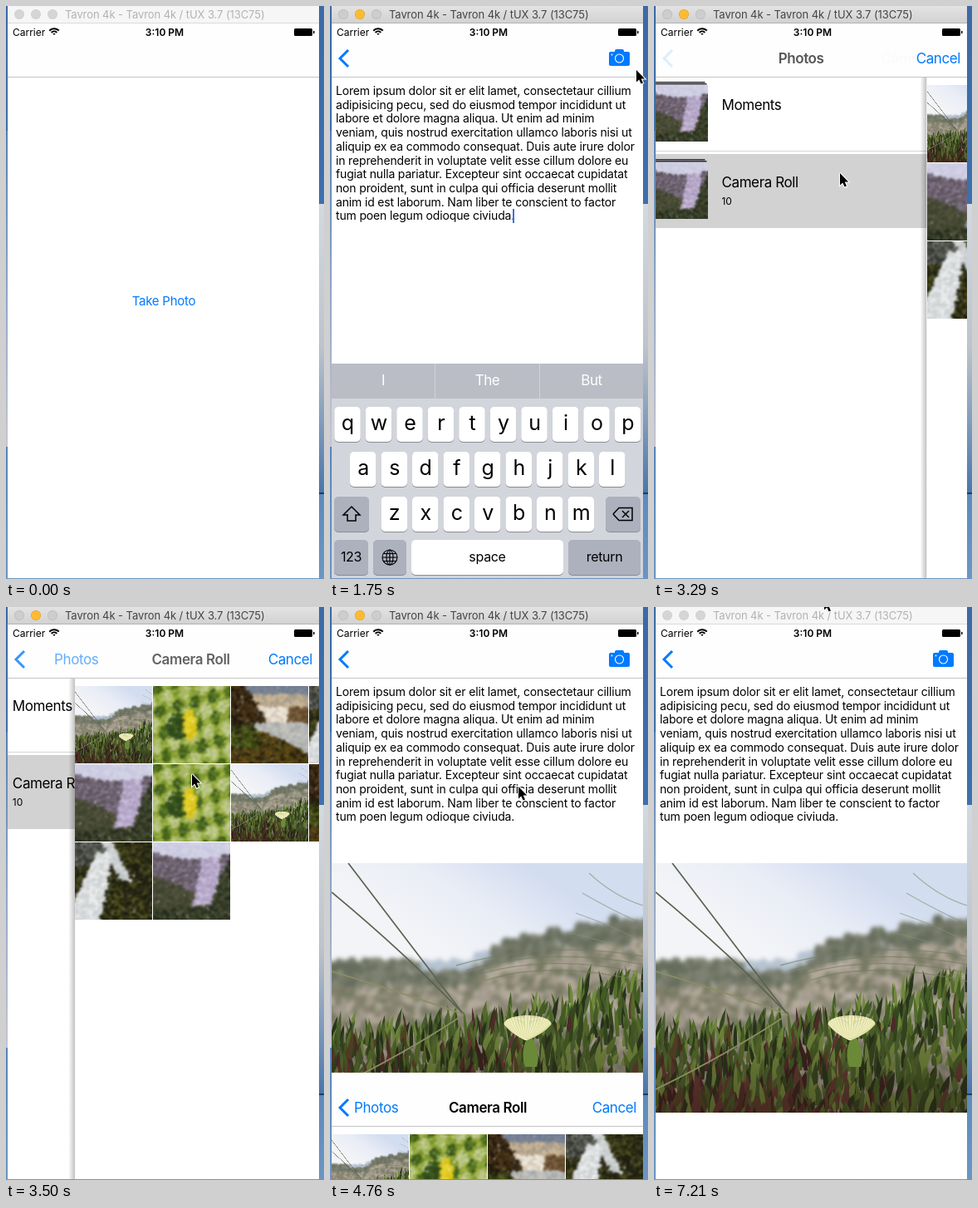
An HTML page with a canvas for the animation above (7.28 s loop, 383x689 px).

```html
<!DOCTYPE html>
<html lang="en">
<head>
<meta charset="utf-8">
<title>Photo picker demo</title>
<style>
html, body { margin: 0; width: 100%; height: 100%; overflow: hidden; }
canvas { display: block; }
</style>
</head>
<body>
<canvas id="stage" width="383" height="689"></canvas>
<script>
const LOOP = 7280, BLUE = '#007aff';
const LEFT = 2, TOP = 21, WIDTH = 375, HEIGHT = 667, RIGHT = LEFT + WIDTH, CENTER = 190;
const c = document.getElementById('stage').getContext('2d');

// ---------- helpers ----------
const clamp = x => Math.min(1, Math.max(0, x));
const easeOut = (t, start, duration) => 1 - (1 - clamp((t - start) / duration)) ** 2.5;

let seed = 7;
const random = () => (seed = (seed * 16807) % 2147483647) / 2147483647;
const pick = list => list[Math.floor(random() * list.length)];

function text(s, x, y, size, color = '#000', align = 'left', weight = 400) {
  c.font = `${weight} ${size}px Inter, sans-serif`;
  c.letterSpacing = `${(12 - size) * 0.08}px`;
  c.textAlign = align;
  c.fillStyle = color;
  c.fillText(s, x, y);
}
function rect(x, y, w, h, color, g = c) {
  g.fillStyle = color;
  g.fillRect(x, y, w, h);
}
function roundRect(x, y, w, h, r, color) {
  c.beginPath();
  c.roundRect(x, y, w, h, r);
  c.fillStyle = color;
  c.fill();
}
function line(points, color, width) {
  c.beginPath();
  points.forEach(([x, y]) => c.lineTo(x, y));
  c.strokeStyle = color;
  c.lineWidth = width;
  c.stroke();
}
function ring(x, y, rx, ry, color, width, from = 0, to = 7) {
  c.beginPath();
  c.ellipse(x, y, rx, ry, 0, from, to);
  c.strokeStyle = color;
  c.lineWidth = width;
  c.stroke();
}
function dot(x, y, r, color, g = c) {
  g.beginPath();
  g.arc(x, y, r, 0, 7);
  g.fillStyle = color;
  g.fill();
}
function blend(g, x0, y0, x1, y1, ...colors) {
  const gradient = g.createLinearGradient(x0, y0, x1, y1);
  colors.forEach((color, i) => gradient.addColorStop(i / (colors.length - 1), color));
  return gradient;
}
const vertical = (y0, y1, ...colors) => blend(c, 0, y0, 0, y1, ...colors);
function layer(dx, dy, alpha, draw) {
  c.save();
  c.translate(dx, dy);
  c.globalAlpha *= clamp(alpha);
  draw();
  c.restore();
}

// ---------- pictures ----------
function picture(w, h, paint) {
  const canvas = document.createElement('canvas');
  canvas.width = w;
  canvas.height = h;
  paint(canvas.getContext('2d'));
  return canvas;
}
// Covers a picture with soft daubs; tone(x, y) gives the palette at a place from 0 to 1.
function daub(g, w, h, size, blur, tone) {
  const rough = picture(w, h, r => {
    for (let y = 0; y <= h; y += size)
      for (let x = 0; x <= w; x += size) {
        const palette = tone(x / w, y / h);
        if (palette) dot(x + random() * size, y + random() * size, size * (0.7 + random() * 0.4), pick(palette), r);
      }
  });
  g.filter = `blur(${blur}px)`;
  g.drawImage(rough, -3 * blur, -3 * blur, w + 6 * blur, h + 6 * blur);
  g.filter = 'none';
}
const tile = tone => picture(93, 93, g => daub(g, 93, 93, 2.5, 0.8, tone));

const darkMoss = ['#1b1c11', '#2b2d17', '#393a1a', '#50501f', '#22200f'];
const lemon = tile((x, y) => {
  if (Math.hypot((x - 0.47) / 0.08, (y - 0.5) / 0.2) < 1) return ['#e2cb1e', '#d4bd18', '#e9d636'];
  if (Math.hypot((x - 0.32) / 0.14, (y - 0.52) / 0.16) < 1) return ['#2f491a', '#3d5c1d'];
  const leaves = Math.sin(17 * x + 9 * y) * Math.cos(13 * y - 11 * x);
  if (leaves > 0.35) return ['#46651c', '#5d7d24', '#38521b'];
  return leaves > -0.2 ? ['#8da435', '#a3b548', '#7a9430'] : ['#b4c27a', '#a4b65c', '#c3cc96'];
});
const sunset = tile((x, y) => {
  if (y > 0.52 + 0.38 * x * x) return x < 0.35 && y < 0.8 ? ['#3f4c16', '#5a651d', '#2b2a10'] : ['#4c3a14', '#2d220d', '#6b4f1a', '#4a4616'];
  if (y > 0.47) return x < 0.3 ? darkMoss : ['#b6b7b4', '#a5abae', '#c3c1ba'];
  if (x < 0.18 + 0.6 * y) return ['#2c2010', '#3d2b15', '#1e170c', '#513a1c'];
  if (y < 0.27) return y < 0.12 ? ['#6f7c91', '#7d8594'] : ['#a99c8c', '#c8b593'];
  return x < 0.72 ? ['#f0e9dc', '#e3dacb', '#d4cabb'] : ['#60472a', '#7b6040'];
});
const stream = tile((x, y) => {
  if (Math.abs(x - 0.42 + 0.3 * y) < 0.08 + 0.14 * y && y > 0.15) return ['#dfe1e2', '#ced2d4', '#eceeee'];
  if (Math.abs(x - 0.4 - 0.5 * y) < 0.07 && y < 0.5) return ['#c2c6c7', '#d5d8d9'];
  return y < 0.3 && x < 0.5 ? ['#4f524b', '#343830', '#676962'] : darkMoss;
});
const falls = tile((x, y) => {
  if (y < 0.13 + 0.1 * Math.sin(3 * x)) return ['#d3d3e6', '#c9c8df'];
  if (Math.abs(x - 0.74 + 0.2 * y * y) < 0.12 && y < 0.78) return ['#b9aacb', '#cabddb', '#aa9bbd'];
  if (x > 1.05 - 0.45 * y || y > 0.82) return ['#2c3522', '#39432a', '#252b1d', '#4a4c34'];
  return y > 0.42 + 0.4 * x ? ['#474b34', '#54533f', '#3c422d'] : ['#66596a', '#756878', '#5b5459', '#827389'];
});

function curve(g, color, width, x0, y0, cx, cy, x1, y1) {
  g.beginPath();
  g.moveTo(x0, y0);
  g.quadraticCurveTo(cx, cy, x1, y1);
  g.strokeStyle = color;
  g.lineWidth = width;
  g.stroke();
}
function leaf(g, x, y, lean, length, width, color) {
  g.beginPath();
  g.moveTo(x - width / 2, y);
  g.quadraticCurveTo(x - width, y - length * 0.5, x + lean, y - length);
  g.quadraticCurveTo(x + width + lean * 0.4, y - length * 0.5, x + width / 2, y);
  g.fillStyle = color;
  g.fill();
}
const dune = picture(375, 300, g => {
  rect(0, 0, 375, 300, blend(g, 230, 0, 150, 120, '#d3ddf0', '#e9edf6', '#f3f4f7'), g);
  daub(g, 375, 300, 6, 2.5, (x, y) => {
    const depth = y - 0.39 + 0.17 * Math.sqrt(Math.max(0, (x - 0.45) / 0.55));
    if (depth < 0) return null;
    if (x > 0.3 && x < 0.5 && depth < 0.04) return ['#b6c3d2'];
    return depth < 0.09 ? ['#737868', '#7f8272', '#666d5c'] : ['#a39b8d', '#85826f', '#b4aa9c', '#777a63'];
  });
  const edge = x => 195 - 80 * (x / 375) ** 2;
  const greens = ['#556c2b', '#435b24', '#71893d', '#34461f', '#4b6130', '#28331b'];
  const reds = ['#502b28', '#633833', '#3b211f', '#584227'];
  const count = 1100;
  for (let i = 0; i < count; i++) {
    const depth = i / count, x = random() * 385, y = edge(x) + 18 + depth * (315 - edge(x));
    leaf(g, x, y, (random() - 0.4) * 16, 14 + 26 * random(), 3 + 4 * depth,
      pick(random() < 0.75 * depth * (1.1 - x / 375) ? reds : greens));
  }
  rect(0, 180, 375, 120, blend(g, 0, 180, 0, 300, 'rgba(35,20,12,0)', 'rgba(35,20,12,.4)'), g);
  // Dry stalks from the left meet at one point; thin blades sweep in from the right.
  [[20, 0], [0, 35], [0, 130], [0, 272]].forEach(([x, y]) =>
    curve(g, y < 100 ? '#5a6350' : '#8b8d63', 1.7, x, y, 90, 92 + y / 2, 159, 182));
  for (let i = 0; i < 4; i++) {
    curve(g, '#87907499', 1.2, 310 - 8 * i, 12 + 24 * i, 340, 40 + 18 * i, 375, 51 + 22 * i);
    curve(g, '#747c5c99', 1.3, 150 + 12 * i, 123 + 6 * i, 260, 92 + 8 * i, 375, 112 + 10 * i);
  }
  leaf(g, 240, 245, -2, 40, 14, '#6a8a38');
  for (let i = 0; i <= 40; i++) {
    const angle = Math.PI * (1 + i / 40);
    curve(g, i % 2 ? '#f3f1cd' : '#dfdf9e', 2, 234, 212, 236 + 18 * Math.cos(angle), 205, 236 + 28 * Math.cos(angle), 193 + 10 * Math.sin(angle));
  }
});

const kinds = [dune, lemon, sunset, stream, falls];
const album = [...kinds, lemon, dune, sunset, stream, falls];
function thumbnail(image, x, y, size) {
  const side = image.height;
  c.drawImage(image, (image.width - side) / 2, 0, side, side, x, y, size, size);
}

// ---------- interface parts ----------
function navBar() {
  rect(LEFT, TOP, WIDTH, 64, '#fefefe');
  rect(LEFT, 85, WIDTH, 1, '#c4c4c6');
}
const chevron = () => line([[22, 53], [12, 63], [22, 73]], BLUE, 3);
function cameraIcon() {
  roundRect(336, 55, 25, 17, 2, BLUE);
  roundRect(343, 52, 11, 6, 2, BLUE);
  ring(348.5, 63, 5, 5, '#fff', 1.1);
  dot(339.5, 58.5, 0.9, '#fff');
}

// Slides a page in from the right over another one that drifts left.
function pushPages(p, under, over) {
  if (p < 1) layer(-0.3 * WIDTH * p, 0, 1, under);
  if (p > 0) layer(WIDTH * (1 - p), 0, 1, () => {
    if (p < 1) rect(LEFT - 8, 86, 8, HEIGHT, blend(c, LEFT - 8, 0, LEFT, 0, 'rgba(0,0,0,0)', 'rgba(0,0,0,.25)'));
    rect(LEFT, 86, WIDTH, HEIGHT, '#fff');
    over();
  });
}

const paragraph = [
  'Lorem ipsum dolor sit er elit lamet, consectetaur cillium',
  'adipisicing pecu, sed do eiusmod tempor incididunt ut',
  'labore et dolore magna aliqua. Ut enim ad minim',
  'veniam, quis nostrud exercitation ullamco laboris nisi ut',
  'aliquip ex ea commodo consequat. Duis aute irure dolor',
  'in reprehenderit in voluptate velit esse cillum dolore eu',
  'fugiat nulla pariatur. Excepteur sint occaecat cupidatat',
  'non proident, sunt in culpa qui officia deserunt mollit',
  'anim id est laborum. Nam liber te conscient to factor',
  'tum poen legum odioque civiuda.'
];

function mainScreen(t) {
  const p = easeOut(t, 1038, 520);
  rect(LEFT, TOP, WIDTH, HEIGHT, '#fff');
  pushPages(p,
    () => layer(0, 0, t < 980 ? 1 : 0.22, () => text('Take Photo', CENTER, 360, 15, BLUE, 'center')),
    () => {
      paragraph.forEach((s, i) => text(s, 7, 107 + i * 16.7, 14));
      if (t > 1540 && t < 1930) rect(220, 244, 2, 17, '#3f70e0');
      if (t >= 4620) c.drawImage(dune, LEFT, 308);
    });
  navBar();
  layer(0, 0, p, chevron);
  layer(0, 0, p, cameraIcon);
}

const KEY_GRAY = '#adb1bd';
function key(x, row, w, label, size = 16, color = KEY_GRAY) {
  const y = [482, 536, 590, 642][row];
  roundRect(x, y + 1, w, 42, 5, '#898c92');
  roundRect(x, y, w, 42, 5, color);
  text(label, x + w / 2, y + (size > 20 ? 28 : 26), size, '#000', 'center');
}
function keyboard() {
  rect(LEFT, 430, WIDTH, 260, '#d2d5db');
  rect(LEFT, 430, WIDTH, 42, '#babdc5');
  ['I', 'The', 'But'].forEach((s, i) => {
    text(s, 64 + i * 125.5, 456, 17, '#fff', 'center');
    if (i) rect(i * 126, 430, 1, 42, '#d0d3d9');
  });
  ['qwertyuiop', 'asdfghjkl', 'zxcvbnm'].forEach((letters, row) =>
    [...letters].forEach((s, i) => key(CENTER - 16 + (i - (letters.length - 1) / 2) * 37.5, row, 31.5, s, 25, '#fff')));
  key(5, 2, 42, '');
  key(332, 2, 42, '');
  key(5, 3, 41, '123');
  key(52, 3, 40, '');
  key(98, 3, 183, 'space', 16, '#fff');
  key(287, 3, 87, 'return');
  layer(26, 611, 1, () =>
    line([[-5, 1], [-10, 1], [0, -9], [10, 1], [5, 1], [5, 8], [-5, 8], [-5, 0]], '#000', 1.5));
  layer(356, 611, 1, () => {
    line([[-15, 0], [-8, -7.5], [8, -7.5], [8, 7.5], [-8, 7.5], [-15, 0]], '#000', 1.5);
    for (const s of [-4, 4]) line([[-4, s], [4, -s]], '#000', 1.5);
  });
  layer(72, 663, 1, () => {
    for (const r of [0.1, 4, 9]) ring(0, 0, r, 9, '#000', 1.1);
    for (const y of [-4.5, 0, 4.5]) line([[-Math.sqrt(81 - y * y), y], [Math.sqrt(81 - y * y), y]], '#000', 1.1);
  });
}

function albumRow(y, name, count) {
  for (const i of [0, 1]) rect(16 - 2 * i, y + 6 + 2 * i, 60 + 4 * i, 1.5, '#302e37');
  thumbnail(falls, 12, y + 10, 68);
  text(name, 96, y + 40, 17);
  text(count, 96, y + 61, 12);
}
function picker(t) {
  const p = easeOut(t, 3263, 520);
  rect(LEFT, TOP, WIDTH, HEIGHT, '#fff');
  pushPages(p,
    () => {
      rect(LEFT, 174, WIDTH, 1, '#d4d4d6');
      if (t >= 3220) rect(LEFT, 178, WIDTH, 89, '#d2d2d2');
      albumRow(85, 'Moments', '');
      albumRow(178, 'Camera Roll', '10');
    },
    () => album.forEach((image, i) => thumbnail(image, LEFT + (i % 4) * 94, 95 + Math.floor(i / 4) * 94, 93)));
  navBar();
  layer(-100 * p, 0, 1 - 2.6 * p, () => text('Photos', CENTER, 69, 17, '#000', 'center', 600));
  layer(134 * (1 - p), 0, p * p, () => text('Photos', 29, 69, 17, BLUE));
  layer(150 * (1 - p), 0, p * p, () => text('Camera Roll', CENTER, 69, 17, '#000', 'center', 600));
  layer(0, 0, p, chevron);
  text('Cancel', 369, 69, 17, BLUE, 'right');
}

function statusBar() {
  text('Carrier', 8, 36, 12);
  text('3:10 PM', 191, 36, 12, '#000', 'center', 600);
  for (let i = 0; i < 3; i++) ring(58, 35, 1.2 + 3.3 * i, 1.2 + 3.3 * i, '#000', 2, -2.4, -0.75);
  roundRect(347, 27, 22, 9, 1.5, '#000');
  rect(370, 30, 1.5, 3, '#000');
}

function titleBar(active) {
  rect(LEFT, 0, WIDTH, TOP, active ? vertical(0, TOP, '#e3e3e3', '#d1d1d1') : '#f6f6f6');
  rect(LEFT, 20, WIDTH, 1, active ? '#b3b3b3' : '#dadada');
  for (let i = 0; i < 3; i++) {
    const yellow = active && i === 1;
    dot(16 + 20 * i, 10, 6, yellow ? '#e0a02c' : active ? '#b9b9b9' : '#cfcfcf');
    dot(16 + 20 * i, 10, 5.3, yellow ? '#fdbc2f' : active ? '#cdcdcd' : '#d5d5d5');
  }
  text('Tavron 4k - Tavron 4k / tUX 3.7 (13C75)', 71, 15, 13, active ? '#444' : '#b2b2b2');
}

function desktop() {
  rect(0, 0, 383, 689, vertical(0, 689, '#3b6aa6', '#3f72b2', '#6b95c2'));
  rect(0, 150, LEFT, 380, vertical(150, 530, '#5580b4', '#8fa6c6', '#c6c5d3'));
  rect(RIGHT, 238, 6, 347, vertical(238, 585, '#d3d9e0', '#bcc3cb', '#4a76ab'));
  rect(RIGHT, 585, 6, 2, '#203b60');
}

// Pointer stops: arrival time, x, y. Longer ways take longer.
const route = [
  [0, 222, -18], [770, 197, 350], [1750, 369, 77], [2030, 345, 60], [3080, 224, 201],
  [3990, 227, 216], [6160, 292, 160], [6370, 276, 121], [6720, 219, 43], [7070, 205, -11]
];
function pointer(t) {
  const i = Math.max(1, route.findLastIndex(stop => stop[0] <= t) + 1);
  const [, x0, y0] = route[i - 1], [arrival, x1, y1] = route[i] || route[i - 1];
  const travel = 180 + 1.2 * Math.hypot(x1 - x0, y1 - y0);
  const u = clamp(1 - (arrival - t) / travel), k = u * u * (3 - 2 * u);
  layer(x0 + (x1 - x0) * k, y0 + (y1 - y0) * k, 1, () => {
    const arrow = [[0, 0], [0, 14.5], [3.3, 11.4], [5.6, 16.6], [8, 15.6], [5.7, 10.5], [10.2, 10.5], [0, 0]];
    line(arrow, '#fff', 2);
    c.fillStyle = '#000';
    c.fill();
  });
}

function draw(t) {
  desktop();
  c.save();
  c.beginPath();
  c.rect(LEFT, TOP, WIDTH, HEIGHT);
  c.clip();
  mainScreen(t);
  const keys = easeOut(t, 1420, 260) - easeOut(t, 2250, 300);
  if (keys > 0) layer(0, 259 * (1 - keys), 1, keyboard);
  const sheet = easeOut(t, 2250, 510) - easeOut(t, 4617, 298);
  if (sheet > 0) layer(0, HEIGHT * (1 - sheet), 1, () => picker(t));
  statusBar();
  c.restore();
  titleBar(t >= 770 && t < 7210);
  pointer(t);
}

function tick() {
  draw(performance.now() % LOOP);
  requestAnimationFrame(tick);
}
tick();
</script>
</body>
</html>
```
